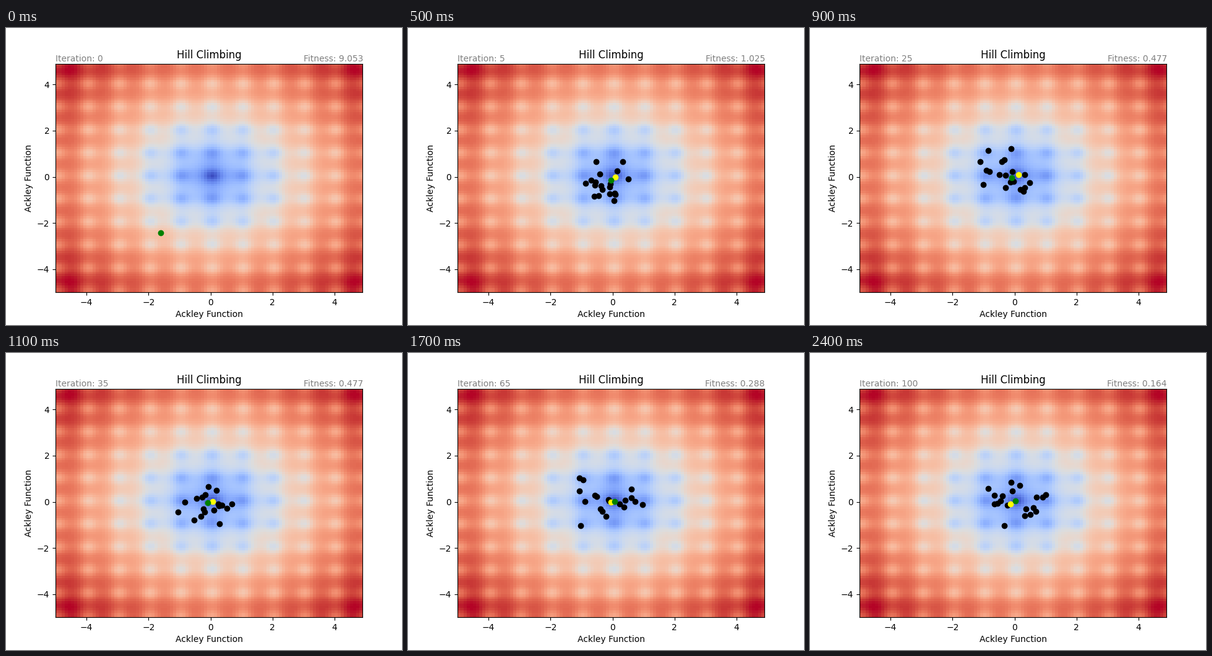
A matplotlib script that plays this animation: 640 by 480 pixels, repeating every 2.5 s.

```python
import matplotlib.pyplot as plt
import numpy as np
from matplotlib.animation import FuncAnimation

ITERS = [0, 1, 2, 3, 4, *range(5, 101, 5)]
CLOUD = 20
SPREAD = 0.5

# Accepted solutions: first iteration, x, y, fitness
PATH = [
    (0, -1.61, -2.43, 9.053),
    (2, -0.96, -1.06, 3.796),
    (3, -0.31, -0.26, 3.025),
    (4, -0.05, -0.153, 1.025),
    (10, 0.093, -0.02, 0.502),
    (25, -0.085, -0.035, 0.477),
    (40, 0.066, 0.01, 0.288),
    (75, 0.03, 0.029, 0.164),
]


def ackley(x, y):
    bowl = -20 * np.exp(-0.2 * np.sqrt(0.5 * (x**2 + y**2)))
    waves = -np.exp(0.5 * (np.cos(2 * np.pi * x) + np.cos(2 * np.pi * y)))
    return bowl + waves + np.e + 20


def solution(it):
    return [step for step in PATH if step[0] <= it][-1][1:]


def neighbours(frame):
    """Random points around the solution, best one first."""
    x, y, _ = solution(ITERS[frame])
    rng = np.random.default_rng(frame)
    pts = rng.normal((x, y), SPREAD, (CLOUD, 2))
    pts = pts[np.argsort(ackley(*pts.T))]
    # The best neighbour is accepted if the climb moves on next
    after = solution(ITERS[min(frame + 1, len(ITERS) - 1)])[:2]
    if after != (x, y):
        pts[0] = after
    return pts


fig, ax = plt.subplots(figsize=(6.4, 4.8), dpi=100)
axis = np.arange(100) / 10 - 5
gx, gy = np.meshgrid(axis, axis)
ax.pcolormesh(gx, gy, ackley(gx, gy)[:-1, :-1], cmap="coolwarm",
              shading="flat", zorder=0)
ax.set(xlim=(-5, 4.9), ylim=(-5, 4.9), title="Hill Climbing",
       xlabel="Ackley Function", ylabel="Ackley Function")

cloud = ax.scatter([], [], color="black", zorder=1.1)
best = ax.scatter([], [], color="yellow", zorder=1.2)
here = ax.scatter([], [], color="green", zorder=1.3)
label = dict(transform=ax.transAxes, color="gray", fontsize=10)
iter_text = ax.text(0, 1.01, "", ha="left", **label)
fit_text = ax.text(1.002, 1.01, "", ha="right", **label)


def update(frame):
    it = ITERS[frame]
    x, y, fitness = solution(it)
    pts = neighbours(frame) if frame else np.empty((0, 2))
    cloud.set_offsets(pts[1:])
    best.set_offsets(pts[:1])
    here.set_offsets([(x, y)])
    iter_text.set_text(f"Iteration: {it}")
    fit_text.set_text(f"Fitness: {fitness:.3f}")
    return cloud, best, here, iter_text, fit_text


anim = FuncAnimation(fig, update, frames=len(ITERS), interval=100,
                     repeat=True, repeat_delay=0)
plt.show()
```
